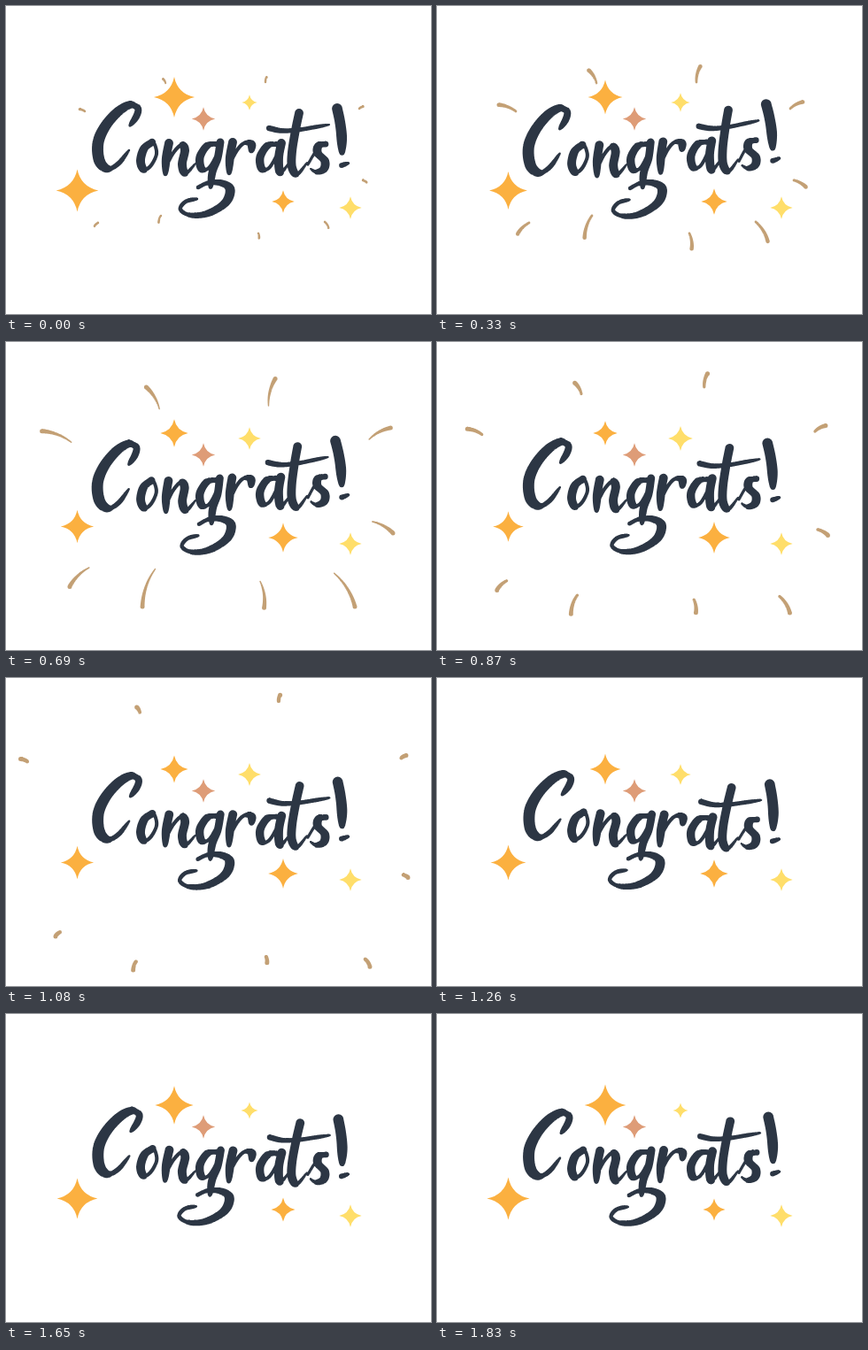
Animation, 480 px wide and 348 px high, one loop 1.86 s. Source, as an HTML page with a canvas:

```html
<!DOCTYPE html>
<html lang="en">
<head>
<meta charset="utf-8">
<title>Congrats!</title>
<style>
html, body { margin: 0; width: 100%; height: 100%; overflow: hidden; background: #fff; }
canvas { display: block; }
</style>
</head>
<body>
<canvas id="stage" width="480" height="348" role="img" aria-label="Congrats!"></canvas>
<script>
const ctx = document.getElementById('stage').getContext('2d');
const LOOP = 1860, STEP = 30, CX = 241, CY = 174;
const INK = '#2c3644', ORANGE = '#fbb040', YELLOW = '#ffde6a', ROSE = '#de9c77', TAN = '#c3a075';

const mix = (a, b, u) => a + (b - a) * u;
const clamp = (v, lo, hi) => Math.max(lo, Math.min(hi, v));

// 0 at time "low", 1 half a loop later, straight in between
function triangle(t, low) {
  const d = Math.abs(t - low) % LOOP;
  return Math.min(d, LOOP - d) / (LOOP / 2);
}

function dab(path, x, y, r) {
  path.moveTo(x + r, y);
  path.arc(x, y, r, 0, Math.PI * 2);
}

// Point and direction on a smooth curve through key points
function curve(pts, i, u) {
  const at = k => pts[clamp(k, 0, pts.length - 1)];
  return [0, 1].map(j => {
    const [a, b, c, d] = [-1, 0, 1, 2].map(k => at(i + k)[j]);
    const p = (c - a) / 2, q = a - 2.5 * b + 2 * c - d / 2, r = (3 * b - a - 3 * c + d) / 2;
    return [b + u * (p + u * (q + u * r)), p + u * (2 * q + u * 3 * r)];
  });
}

// The brush presses on the way down, lifts on the way up and thins out at the end
function stroke(path, size, text, ox = 0, oy = 0) {
  const v = text.split(' ').map(Number), pts = [];
  for (let i = 0; i < v.length; i += 2) pts.push([v[i] + ox, v[i + 1] + oy]);
  const spans = pts.length - 1, n = 28;
  for (let k = 0; k <= spans * n; k++) {
    const i = Math.min(spans - 1, Math.floor(k / n));
    const [[x, dx], [y, dy]] = curve(pts, i, k / n - i);
    const press = clamp(0.57 + 0.43 * dy / (Math.hypot(dx, dy) || 1), 0.42, 1);
    const lift = 1 - 0.55 * clamp((k / n - spans + 1), 0, 1) ** 2;
    dab(path, x, y, size * press * lift / 2);
  }
}

const word = new Path2D();
const ink = (...s) => stroke(word, ...s);
const bowl = (x, y) => ink(9.5, '18 3 8 5 0 18 2 31 10 30 18 17 22 4', x, y);
const stem = (x, y) => ink(10, '4 0 1 16 0 35', x, y);

// C
ink(13, '149 114 141 111.5 127 119 112 136 104 155 105.5 175 115 184 127 178 139 163');
ink(8, '141 111.5 149 116 147 125 140 135');
// o
ink(10, '165 154 156 161 152 175 156 185 164 180 170 167 167 155 161 155');
// n
stem(180, 155);
ink(10, '181 181 189 166 198 157 202 163 199 179 203 189 214 178');
// g
bowl(219, 153);
ink(9, '242 154 239 172 233 188 231 205');
ink(11, '217 205 228 200 243 200 253 207 248 222 229 234 209 236.5 197 230 203 221 216 218');
// r
stem(252, 154);
ink(10, '253 178 261 163 269 155 277 156 277 164');
// a
bowl(287, 153);
ink(10, '311 155 308 172 310 188 320 177');
// t
ink(9.5, '297 138 312 141 330 140 348 137 365 134');
ink(10, '331 121 327 140 323 165 323 182 329 190 340 177');
// s
ink(8, '341 179 350 164 360 154');
ink(10, '361 156 353 158 352 166 360 175 359 184 351 187.5 344 184');
// !
ink(12, '374 116 377 130 379 146 379.5 166');
ink(13, '379 180 387 177.5');

// x, y, radius at the middle of the loop, change towards its ends
const stars = [
  [190, 103, 13.5, 10, ORANGE], [223, 127.5, 13.2, 0, ROSE], [275, 109, 14, -5.5, YELLOW],
  [80.5, 208.5, 17.2, 7, ORANGE], [313, 221, 18, -5.5, ORANGE], [389, 228, 12.7, 0, YELLOW]
];

// start and end of each ray
const rays = [
  [89, 119, 15, 91], [180, 87, 147, 32], [293, 86, 310, 18],
  [399, 116, 453, 87], [403, 197, 455, 226], [360, 244, 412, 328],
  [285, 257, 295, 323], [175, 237, 143, 332], [104, 245, 55, 293]
];

function drawWord(t) {
  ctx.save();
  ctx.translate(CX, CY);
  ctx.rotate(mix(-0.055, 0.05, triangle(t, 490)));
  ctx.translate(-CX, -CY);
  ctx.fillStyle = INK;
  ctx.fill(word);
  ctx.restore();
}

function drawStar([x, y, base, swing, color], t) {
  const r = base + swing * triangle(t, 890), c = r * 0.17;
  ctx.fillStyle = color;
  ctx.beginPath();
  ctx.moveTo(x, y - r);
  ctx.quadraticCurveTo(x + c, y - c, x + r, y);
  ctx.quadraticCurveTo(x + c, y + c, x, y + r);
  ctx.quadraticCurveTo(x - c, y + c, x - r, y);
  ctx.quadraticCurveTo(x - c, y - c, x, y - r);
  ctx.fill();
}

// A bent dash, thin inside and round outside
function drawRay([ax, ay, bx, by], from, to) {
  const path = new Path2D(), n = 60, side = ax > CX ? 1 : -1;
  const size = Math.min(1, 0.4 + 2 * to);
  for (let i = 0; i <= n; i++) {
    const u = i / n, f = mix(from, to, u);
    const bend = 0.3 * u * (1 - u) * (to - from) * side;
    const r = size * Math.max(0.7, 2.5 * (1 - (to - f) / 0.65));
    dab(path, mix(ax, bx, f) + (by - ay) * bend, mix(ay, by, f) - (bx - ax) * bend, r);
  }
  ctx.fillStyle = TAN;
  ctx.fill(path);
}

function drawRays(t) {
  if (t >= 1110) return;
  const to = t < 540
    ? mix(0.08, 0.64, (t / 540) ** 2.3)
    : mix(0.64, 0.98, ((t - 540) / 540) ** 2.5);
  const from = Math.max(0, (t - 570) / 580);
  rays.forEach(r => drawRay(r, from, to));
}

function frame() {
  const t = Math.floor(performance.now() % LOOP / STEP) * STEP;
  ctx.fillStyle = '#fff';
  ctx.fillRect(0, 0, 480, 348);
  drawRays(t);
  stars.forEach(s => drawStar(s, t));
  drawWord(t);
  requestAnimationFrame(frame);
}
frame();
</script>
</body>
</html>
```
